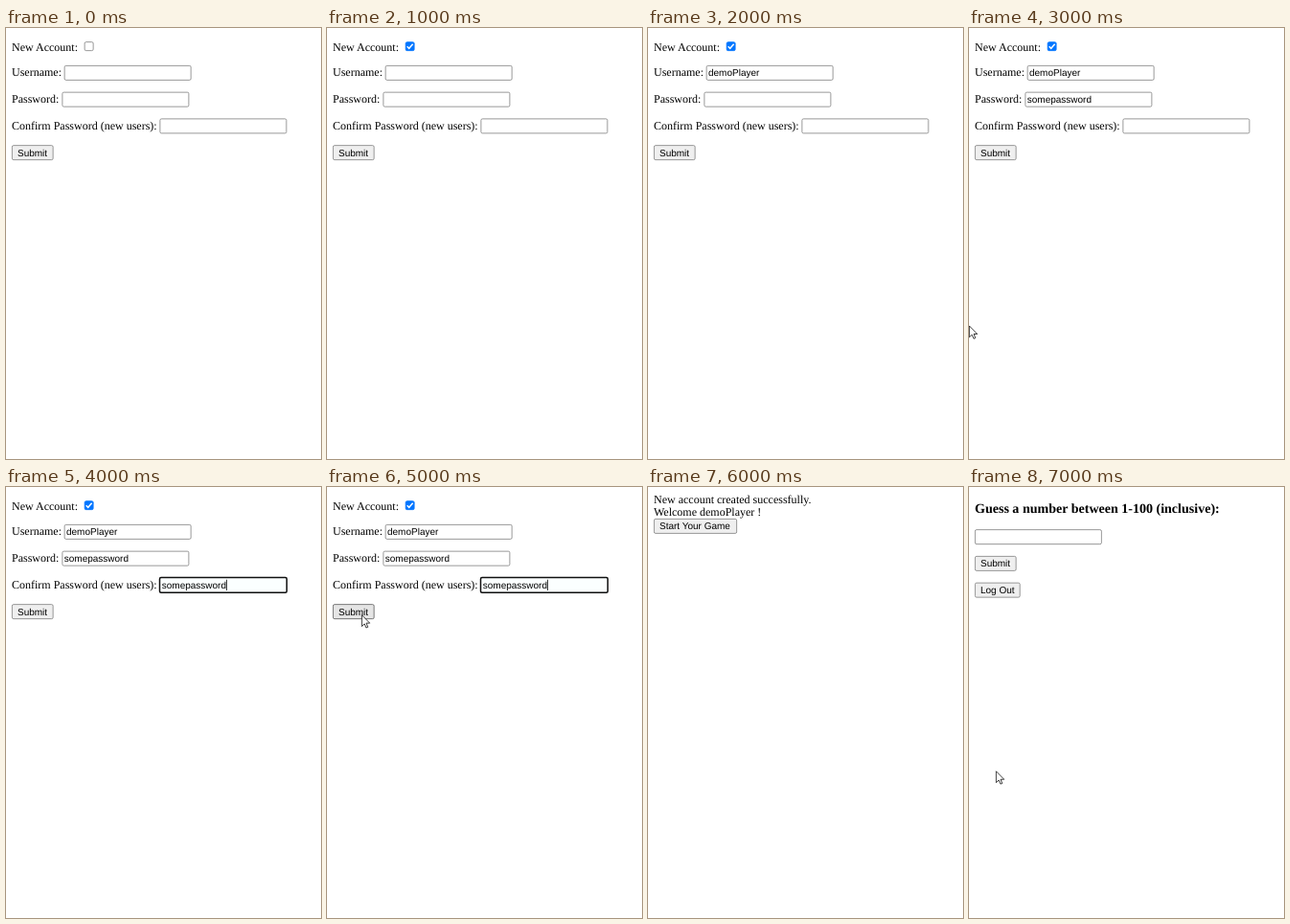
An HTML page for the animation above (8000 ms loop, 329 by 450 pixels).

```html
<!DOCTYPE html>
<html lang="en">
<head>
<meta charset="utf-8">
<title>Sign-up form</title>
<style>
  html, body { margin: 0; width: 100%; height: 100%; overflow: hidden; background: #fff; }
  svg { display: block; }
  text { text-rendering: geometricPrecision; white-space: pre; fill: #000; }
  .label { font: 16px "Liberation Serif", "Times New Roman", serif; }
  .title { font: bold 18.72px "Liberation Serif", "Times New Roman", serif; }
  .ui { font: 13.333px "Liberation Sans", Arial, sans-serif; }
</style>
</head>
<body>
<svg width="329" height="450" viewBox="0 0 329 450">
  <rect width="329" height="450" fill="#fff"/>
  <g id="page" transform="scale(.75)"></g>
</svg>
<script>
const NS = 'http://www.w3.org/2000/svg';
const STEP = 1000, STEPS = 8;
const USER = 'demoPlayer', PASS = 'somepassword';
const page = document.getElementById('page');

function add(parent, tag, attrs = {}, content = '') {
  const el = document.createElementNS(NS, tag);
  for (const key in attrs) el.setAttribute(key, attrs[key]);
  el.textContent = content;
  parent.appendChild(el);
  return el;
}

const group = parent => add(parent, 'g');
const write = (parent, x, y, content, cls) => add(parent, 'text', { x, y, class: cls }, content);

function box(parent, x, y, w, h, fill, stroke = '#767676') {
  return add(parent, 'rect', {
    x: x + .5, y: y + .5, width: w - 1, height: h - 1, rx: 2, fill, stroke
  });
}

const field = (parent, x, y) => box(parent, x, y, 177, 21, '#fff');

function button(parent, y, w, label) {
  const face = box(parent, 8, y, w, 21, '#efefef');
  write(parent, 16, y + 15, label, 'ui');
  return face;
}

// Sign-up form
const form = group(page);
write(form, 8, 32, 'New Account:', 'label');
const tick = box(form, 109, 19, 13, 13, '#fff');
const mark = add(form, 'path', {
  d: 'M111.6 25.6l2.7 2.8 5.2-6', fill: 'none', stroke: '#fff', 'stroke-width': 2
});
write(form, 8, 67, 'Username:', 'label');
field(form, 81, 52);
const user = write(form, 84, 67, USER, 'ui');
write(form, 8, 104, 'Password:', 'label');
field(form, 78, 89);
const pass = write(form, 81, 104, PASS, 'ui');
write(form, 8, 141, 'Confirm Password (new users):', 'label');
field(form, 214, 126);
const confirm = group(form);
add(confirm, 'rect', {
  x: 214, y: 126, width: 177, height: 21, rx: 2,
  fill: '#fbffff', stroke: '#101010', 'stroke-width': 2
});
write(confirm, 217, 141, PASS, 'ui');
add(confirm, 'rect', { x: 307, y: 129, width: 1, height: 15 });
const submit = button(form, 163, 58, 'Submit');

// Welcome page
const welcome = group(page);
write(welcome, 8, 22, 'New account created successfully.', 'label');
write(welcome, 8, 40, `Welcome ${USER} !`, 'label');
button(welcome, 44, 116, 'Start Your Game');

// Guessing game
const game = group(page);
write(game, 8, 36, 'Guess a number between 1-100 (inclusive):', 'title');
field(game, 8, 59);
button(game, 96, 58, 'Submit');
button(game, 133, 63.4, 'Log Out');

const pointer = add(page, 'path', {
  d: 'M.5 .7V16.5L4.2 13 6.6 18.5 9 17.5 6.7 12H11.6Z',
  fill: '#fff', stroke: '#000', 'stroke-linejoin': 'round'
});
const stops = { 3: [0, 414], 5: [48, 177.5], 7: [37.3, 395] };

const show = (el, on) => el.setAttribute('visibility', on ? 'inherit' : 'hidden');

function draw(time) {
  const step = Math.floor(time / STEP) % STEPS;
  show(form, step < 6);
  show(welcome, step === 6);
  show(game, step === 7);

  const checked = step >= 1;
  tick.setAttribute('fill', checked ? '#0075ff' : '#fff');
  tick.setAttribute('stroke', checked ? '#0075ff' : '#767676');
  show(mark, checked);
  show(user, step >= 2);
  show(pass, step >= 3);
  show(confirm, step >= 4);

  const hover = step === 5;
  submit.setAttribute('fill', hover ? '#e5e5e5' : '#efefef');
  submit.setAttribute('stroke', hover ? '#4f4f4f' : '#767676');

  const stop = stops[step];
  show(pointer, stop);
  if (stop) pointer.setAttribute('transform', `translate(${stop})`);
}

let start;
function tickFrame(now) {
  start ??= now;
  draw(now - start);
  requestAnimationFrame(tickFrame);
}
draw(0);
requestAnimationFrame(tickFrame);
</script>
</body>
</html>
```
